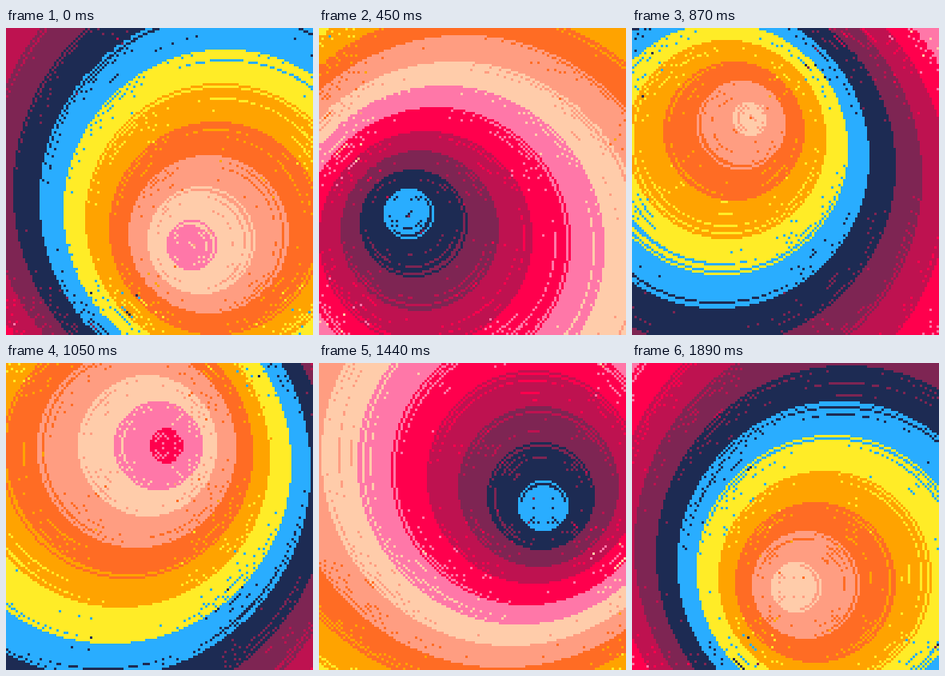
Recreate the animation shown at these times as an HTML page with a canvas. Size 384 px wide and 384 px high, loop 1920 ms.

```html
<!DOCTYPE html>
<html>
<head>
<meta charset="utf-8">
<title>Orbiting rings</title>
<style>
html, body { margin: 0; width: 100%; height: 100%; overflow: hidden; background: #1d2b53; }
canvas { display: block; width: 100vw; height: 100vh; image-rendering: pixelated; }
</style>
</head>
<body>
<canvas id="stage" width="128" height="128"></canvas>
<script>
const SIZE = 128, STEPS = 64, STEP_MS = 30, WARM_UP = 24;
const ORBIT = 30, MAX_R = 150;
const BAND = 11.345, FIRST_EDGE = 10.95;
const START_DEG = 71.93, STEP_DEG = 6, LAG_DEG = 0.7195;
const COLORS = ['ff77a8', 'ffccaa', 'ff9d81', 'ff6c24', 'ffa300', 'ffec27',
                '29adff', '1d2b53', '7e2553', 'be1250', 'ff004d'];

// Canvas pixels are stored as ABGR words
const words = COLORS.map(hex => {
  const v = parseInt(hex, 16);
  return (0xff000000 | (v & 255) << 16 | (v & 0xff00) | v >> 16) >>> 0;
});

const ctx = document.getElementById('stage').getContext('2d');
const image = ctx.createImageData(SIZE, SIZE);
const screen = new Uint32Array(image.data.buffer);
const grid = new Uint8Array(SIZE * SIZE);

function plot(x, y, c) {
  if (x >= 0 && y >= 0 && x < SIZE && y < SIZE) grid[y * SIZE + x] = c;
}

// One-pixel midpoint circle
function ring(cx, cy, r, c) {
  let dx = r, dy = 0, d = 1 - r;
  while (dx >= dy) {
    for (const [a, b] of [[dx, dy], [dy, dx]]) {
      plot(cx + a, cy + b, c);
      plot(cx - a, cy + b, c);
      plot(cx + a, cy - b, c);
      plot(cx - a, cy - b, c);
    }
    dy++;
    if (d >= 0) {
      dx--;
      d -= 2 * dx;
    }
    d += 2 * dy + 1;
  }
}

// Wider rings lag behind on the orbit, in pairs that share a centre.
// Gaps between rings keep what was drawn before.
function drawStep(n) {
  for (let r = 0; r <= MAX_R; r++) {
    const angle = (START_DEG + n * STEP_DEG - (r | 1) * LAG_DEG) * Math.PI / 180;
    const x = Math.floor(64 + ORBIT * Math.cos(angle));
    const y = Math.floor(64 + ORBIT * Math.sin(angle));
    const band = Math.floor((r - FIRST_EDGE) / BAND + 1 - n / 3);
    ring(x, y, r, (band % 11 + 11) % 11);
  }
}

const steps = [];
for (let n = -WARM_UP; n < STEPS; n++) {
  drawStep(n);
  if (n >= 0) steps.push(grid.slice());
}

let shown = -1;
function show(n) {
  if (n === shown) return;
  shown = n;
  const cells = steps[n];
  for (let i = 0; i < cells.length; i++) screen[i] = words[cells[i]];
  ctx.putImageData(image, 0, 0);
}

const start = performance.now();
function tick() {
  const t = performance.now() - start;
  show(Math.floor(t / STEP_MS) % STEPS);
  requestAnimationFrame(tick);
}
tick();
</script>
</body>
</html>
```
